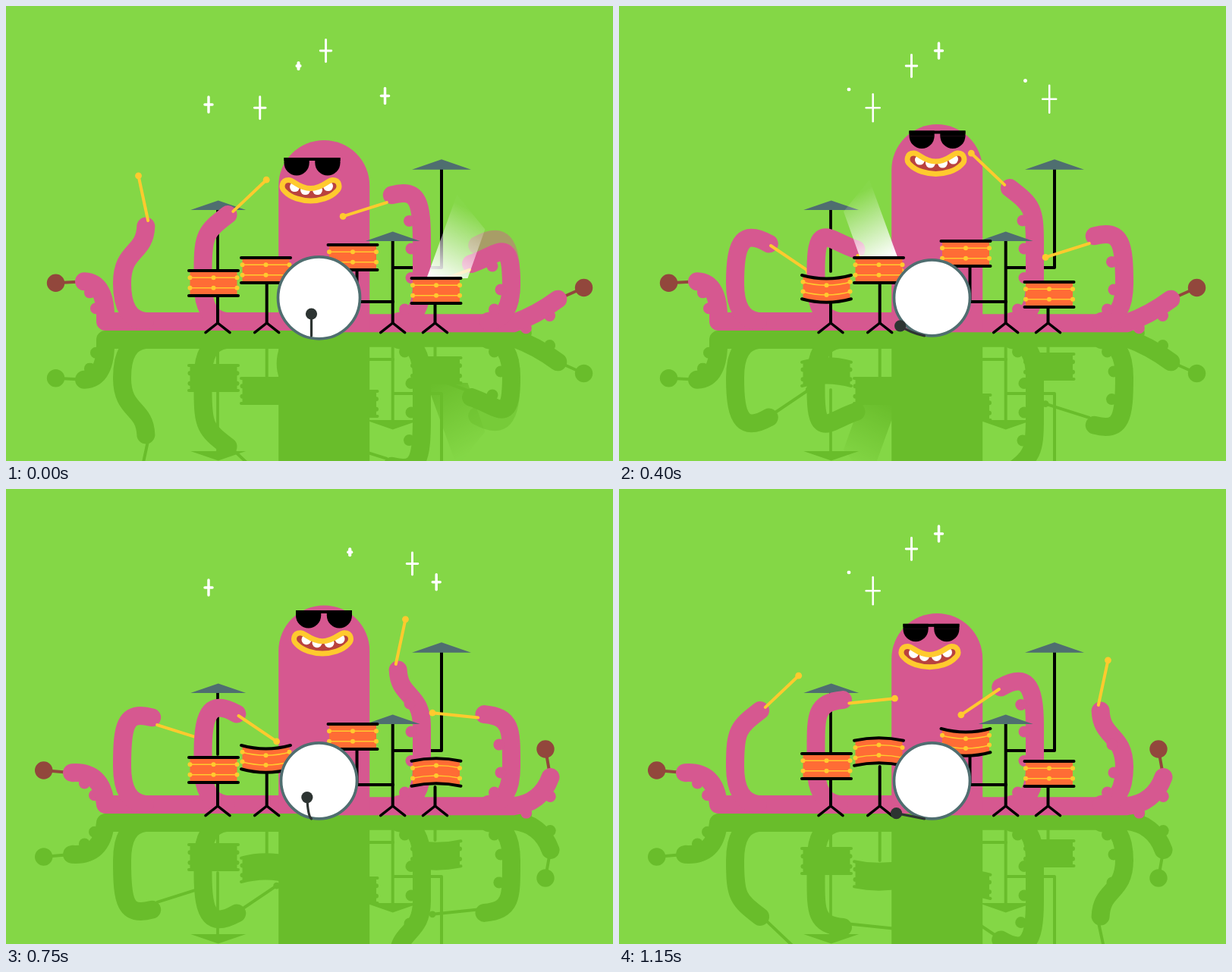
Animation of 800 by 600 pixels, one loop 1200 ms. Source, as an HTML page with a canvas:

```html
<!DOCTYPE html>
<html lang="en">
<head>
<meta charset="utf-8">
<title>Octopus drummer</title>
<style>
  html, body { margin: 0; width: 100%; height: 100%; overflow: hidden; background: #84d746; }
  canvas { display: block; }
</style>
</head>
<body>
<canvas id="stage" width="800" height="600"></canvas>
<script>
const STEP = 50, STEPS = 24, BEAT = 6, FLOOR = 416;
const PINK = '#d65890', YELLOW = '#ffca2e', ORANGE = '#ff6c35', BROWN = '#92473c',
      SLATE = '#4f6e70', DARK = '#2d3432', BLACK = '#000', WHITE = '#fff',
      GRASS = '#84d746', SHADE = '#69bd2b';
const { PI, sin, cos, abs, min, max } = Math;

// hit: the step of the beat on which the stick lands
const ARMS = [
  { x: 0, y: 0, side: 1, hit: 1 },
  { x: 106.5, y: -17, side: 1, hit: 2 },
  { x: 701, y: -52, side: -1, hit: 4 },
  { x: 819, y: 2, side: -1, hit: 0, trail: true }
];
const DRUMS = [
  { x: 241, y: 349, hit: 1 },
  { x: 310, y: 332, hit: 2 },
  { x: 424.5, y: 310, hit: 4 },
  { x: 534.5, y: 359, hit: 0 }
];
// Three groups of three sparkles: place and first step, then the offsets inside a group
const GROUPS = [[267, 130, 15], [385.5, 79, 20], [499.5, 118.5, 0]];
const TRIO = [[0, 0], [36, -20], [67.7, 4.3]];
const TWINKLE = [10, 14.5, 18, 14.5, 4, 0];
const FLICK = [-3, 18, 64, 97, 100, 24, 9, 5];   // maraca angle, degrees

const ctx = document.getElementById('stage').getContext('2d');
const scene = document.createElement('canvas');
scene.width = 800;
scene.height = 600;
const g = scene.getContext('2d');

const rad = degrees => degrees * PI / 180;
const sinceHit = (f, hit) => (f - hit + STEPS) % BEAT;

function stroke(color, width, path) {
  g.strokeStyle = color;
  g.lineWidth = width;
  g.beginPath();
  path();
  g.stroke();
}

function line(color, width, ...p) {
  stroke(color, width, () => {
    for (let i = 0; i < p.length; i += 2) g.lineTo(p[i], p[i + 1]);
  });
}

function shape(color, ...p) {
  g.fillStyle = color;
  g.beginPath();
  for (let i = 0; i < p.length; i += 2) g.lineTo(p[i], p[i + 1]);
  g.fill();
}

function dot(color, x, y, r, end = 2 * PI) {
  g.fillStyle = color;
  g.beginPath();
  g.arc(x, y, r, 0, end);
  g.fill();
}

function place(x, y, sx, sy, draw) {
  g.save();
  g.translate(x, y);
  g.scale(sx, sy);
  draw();
  g.restore();
}

function sparkle(x, y, age) {
  const h = TWINKLE[age];
  if (h === undefined) return;
  const thick = 4.6 - 0.115 * h;
  line(WHITE, thick, x, y - h, x, y + h);
  line(WHITE, thick, x - h / 2, y, x + h / 2, y);
}

// Every sparkle lights up twice a loop, nine steps apart
function sparkles(f) {
  for (const [x, y, start] of GROUPS)
    TRIO.forEach(([dx, dy], i) => {
      for (const wait of [0, 9])
        sparkle(x + dx, y + dy, (f - start - 3 * i - wait + 2 * STEPS) % STEPS);
    });
}

function mouthPath() {
  g.beginPath();
  g.moveTo(-29, -10);
  g.bezierCurveTo(-22, -10, -16, 1, 0, 1);
  g.bezierCurveTo(16, 1, 22, -10, 29, -10);
  g.bezierCurveTo(38, -10, 40, 0, 34, 5);
  g.bezierCurveTo(26, 13.5, 12, 17.3, 0, 17.3);
  g.bezierCurveTo(-12, 17.3, -26, 13.5, -34, 5);
  g.bezierCurveTo(-40, 0, -38, -10, -29, -10);
  g.closePath();
}

function head(f) {
  const low = abs(f % BEAT - 3) / 3;
  const lift = 23.5 * (1 - low * low);
  g.fillStyle = PINK;
  g.beginPath();
  g.arc(419.2, 237 - lift, 60, PI, 0);
  g.lineTo(479.2, 428);
  g.lineTo(359.2, 428);
  g.fill();

  const sway = 15.5 * cos(f * PI / 6) ** 5;
  place(419 - sway, 200 - 1.7 * lift, 1, 1, () => {
    g.fillStyle = BLACK;
    g.fillRect(-37, 0, 74, 4);
    for (const x of [-20.4, 20.4]) {
      g.fillRect(x - 16.6, 0, 33.2, 7);
      dot(BLACK, x, 6.8, 16.6, PI);
    }
    g.translate(-2, 39.6);
    mouthPath();
    g.save();
    g.clip();
    g.fillStyle = '#b9423f';
    g.fill();
    for (const [x, y] of [[-21, -1], [-7, 3], [9, 3], [23, -2]]) dot(WHITE, x, y, 6.5);
    g.restore();
    stroke(YELLOW, 7, mouthPath);
  });
}

function maracaArm(k) {
  const turn = k * PI / 4, bend = cos(turn), swing = cos(turn - PI / 3);
  const cx = 113.6 + 19 * bend, cy = 388.4 - 24 * bend;
  const x = 92.5 + 21 * swing, y = 370.5 - 14.4 * swing;
  const angle = rad(FLICK[k % 8]);
  const bx = x - 37.5 * cos(angle), by = y - 37.5 * sin(angle);
  line(BROWN, 4, x, y, bx, by);
  dot(BROWN, bx, by, 11.7);
  for (const t of [0.2, 0.7]) {
    const s = 1 - t;
    const dx = s * (cx - 131) + t * (x - cx), dy = s * (cy - FLOOR) + t * (y - cy);
    const reach = 12 / Math.hypot(dx, dy);
    dot(PINK, s * s * 131 + 2 * s * t * cx + t * t * x + dy * reach,
              s * s * FLOOR + 2 * s * t * cy + t * t * y - dx * reach, 7.5);
  }
  stroke(PINK, 24, () => {
    g.moveTo(400, FLOOR);
    g.lineTo(131, FLOOR);
    g.quadraticCurveTo(cx, cy, x, y);
  });
}

// All arms are drawn as the far left one; k counts steps since the hit
function tentacle(k, angle, floor) {
  const slack = 0.67 ** k;
  const x = 181 + 25 * slack, y = 289 + 49 * 0.5 ** k;
  const tilt = 0.86 * angle;
  stroke(PINK, 24, () => {
    g.moveTo(183, floor);
    g.quadraticCurveTo(153, floor - 4, 153, floor - 50);
    g.lineTo(153, 365);
    g.bezierCurveTo(153, 324 - 26 * slack, x - 37 * cos(tilt), y - 37 * sin(tilt), x, y);
  });
}

function stickAngle(k) {
  const j = k - 1;
  return rad(k ? 34 - 15.3 * j - 1.17 * j ** 3 : 20);
}

function drumArm(k, floor, suckers, trail) {
  const angle = stickAngle(k), j = k - 1;
  if (trail && !k) {
    g.globalAlpha = 0.45;
    tentacle(1, stickAngle(1), floor);
    g.globalAlpha = 1;
  }
  tentacle(k, angle, floor);
  if (suckers) {
    const near = 0.25 ** k;
    dot(PINK, 169 + 9 * near, 335 + 6 * near, 7.5);
    for (let y = 372; y < floor - 20; y += 38.5) dot(PINK, 167, y, 7.5);
    dot(PINK, 175.5, floor - 16, 7.5);
  }
  const x = k ? 200 - 0.8 * j * j : 208;
  const y = k ? 299.5 + 16.5 * cos(j * PI / 4) : 346;
  const ex = x + 60.5 * cos(angle), ey = y + 60.5 * sin(angle);
  line(YELLOW, 4, x, y, ex, ey);
  dot(YELLOW, ex, ey, 4.4);
}

function beam(x, y, size) {
  place(x, y, size, size, () => {
    const fade = g.createLinearGradient(-8, 0, -52, -84);
    fade.addColorStop(0, 'rgba(255,255,255,1)');
    fade.addColorStop(1, 'rgba(255,255,255,.02)');
    shape(fade, 0, 0, -37, -102, -71, -60, -50, -1);
  });
}

function cymbal(x, y, w) {
  shape(SLATE, x - w, y, x, y - w / 2.9, x + w, y);
}

function stand(x, top) {
  line(BLACK, 4, x, top, x, 418);
  line(BLACK, 3.5, x - 16, 430.7, x, 418, x + 16, 430.7);
}

// The skin sags, drops flat, bulges and rests again
function drum(x, y, k) {
  const [dy, bend] = [[0, 0], [6, 4.5], [5, 0], [-0.3, -3.5]][k] || [0, 0];
  const height = 33 - 0.4 * max(0, bend);
  y += dy;
  const skin = h => () => {
    g.moveTo(x, y + h);
    g.quadraticCurveTo(x + 32.5, y + h + 2 * bend, x + 65, y + h);
  };
  g.fillStyle = ORANGE;
  g.beginPath();
  g.moveTo(x + 1.5, y);
  g.quadraticCurveTo(x + 32.5, y + 2 * bend, x + 63.5, y);
  g.lineTo(x + 63.5, y + height);
  g.quadraticCurveTo(x + 32.5, y + height + 2 * bend, x + 1.5, y + height);
  g.fill();
  for (const h of [0.28 * height, 0.69 * height]) {
    stroke(YELLOW, 1.6, skin(h));
    for (const side of [-1, 0, 1])
      dot(YELLOW, x + 32.5 + 31 * side, y + h + (side ? 0 : bend), 3);
  }
  stroke(BLACK, 4, skin(0));
  stroke(BLACK, 4, skin(height));
}

function bassDrum(k) {
  const r = 50 + 2 * max(0, 2 - k);
  dot(WHITE, 412.5, 384.8, r);
  stroke(SLATE, 3.7, () => g.arc(412.5, 384.8, r, 0, 2 * PI));

  // The pedal stays up, then sinks back until the next kick
  const sink = 1 - abs(1 - max(0, k - 2) / 8);
  const lean = sink * PI / 2, rod = 29 + 13 * sink ** 3;
  const x = 402.5 - rod * sin(lean), y = 435 - rod * cos(lean);
  stroke(DARK, 3.2, () => {
    g.moveTo(x, y);
    g.quadraticCurveTo(402.5 - 19 * min(1, 2 * sink), 431, 402.5, 435);
  });
  dot(DARK, x, y, 7.6);
}

function drawScene(f) {
  g.globalCompositeOperation = 'source-over';
  g.clearRect(0, 0, 800, 600);
  g.lineCap = g.lineJoin = 'round';
  sparkles(f);

  maracaArm(f);
  place(799.5, 2.3, -1, 1, () => maracaArm(f + 5));
  head(f);

  line(BLACK, 3.7, 279, 268, 279, 350);
  cymbal(279.7, 269, 36.5);
  line(BLACK, 4, 574, 214, 574, 345, 510, 345);
  cymbal(574, 215.7, 39);

  for (const { x, y, side, hit, trail } of ARMS)
    place(x, y, side, 1, () => drumArm(sinceHit(f, hit), FLOOR - y, side < 0, trail));
  for (const { x, y, side, hit } of ARMS)
    if (sinceHit(f, hit) === 0)
      place(x, y, side, 1, () => side > 0 ? beam(260.5, 348, 1) : beam(265, 358, 1.09));

  stand(279, 383);
  stand(343.7, 366);
  stand(509.7, 309);
  stand(565.5, 393);
  line(BLACK, 4, 462.5, 344, 462.5, 390, 510, 390);
  cymbal(509.7, 310, 36);

  for (const { x, y, hit } of DRUMS) drum(x, y, sinceHit(f, hit));
  bassDrum(f % 12);
}

function render(f) {
  drawScene(f);
  ctx.globalCompositeOperation = 'source-over';
  ctx.clearRect(0, 0, 800, 600);
  ctx.drawImage(scene, 0, 0);

  // The flat silhouette of the scene, mirrored in the floor
  g.globalCompositeOperation = 'source-in';
  g.fillStyle = SHADE;
  g.fillRect(0, 0, 800, 600);
  ctx.globalCompositeOperation = 'destination-over';
  ctx.save();
  ctx.translate(0, 856);
  ctx.scale(1, -1);
  ctx.drawImage(scene, 0, 0);
  ctx.restore();
  ctx.fillStyle = GRASS;
  ctx.fillRect(0, 0, 800, 600);
}

let begin;
function tick(now) {
  begin ??= now;
  render(Math.floor((now - begin) / STEP) % STEPS);
  requestAnimationFrame(tick);
}
render(0);
requestAnimationFrame(tick);
</script>
</body>
</html>
```
